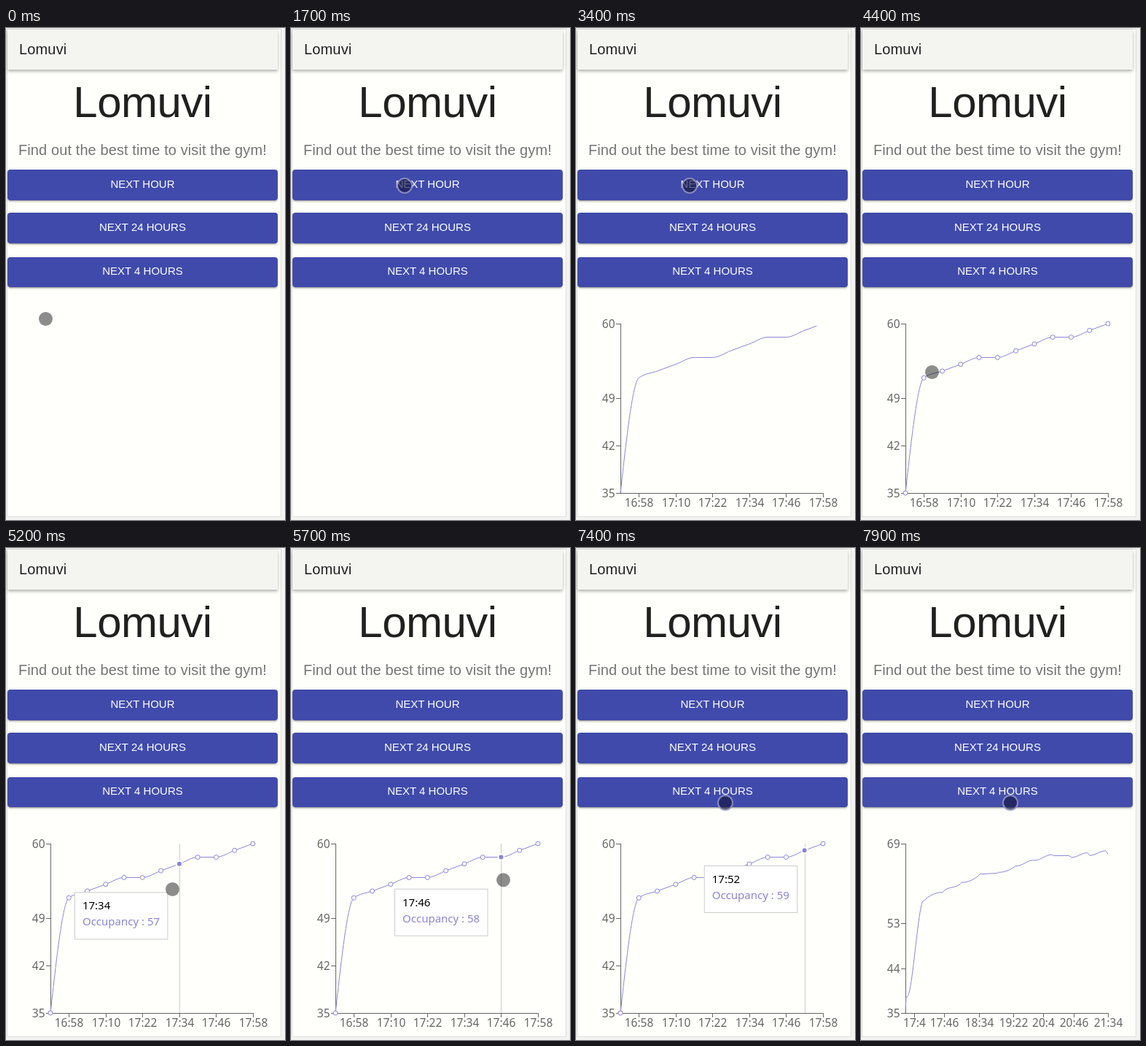
Animation, 383 px wide and 674 px high, one loop 8 s. Source, as an HTML page with a canvas:

```html
<!DOCTYPE html>
<html lang="en">
<head>
<meta charset="utf-8">
<title>Lomuvi</title>
<style>
  html, body { margin: 0; width: 100%; height: 100%; overflow: hidden; background: #f3f3f2; }
  body { font-family: "Liberation Sans", Arial, sans-serif; }
  #stage { position: absolute; left: 0; top: 0; width: 383px; height: 674px; overflow: hidden; }
  #stage > * { position: absolute; box-sizing: border-box; white-space: nowrap; }
  .page { left: 1px; top: 1px; width: 377px; height: 669px; background: #fffffb; border: 1px solid #dededc; }
  .bar { left: 2px; top: 2px; width: 371px; height: 55px; background: #f4f4f1; color: #212121;
    font-size: 20px; line-height: 55px; padding-left: 16px; letter-spacing: .15px;
    box-shadow: 0 2px 4px -1px rgba(0,0,0,.2), 0 3px 4px rgba(0,0,0,.12), 0 1px 8px rgba(0,0,0,.1); }
  .title { left: 2px; top: 67px; width: 371px; text-align: center; color: #20211f;
    font-size: 60px; line-height: 70px; letter-spacing: -.5px; }
  .sub { left: 17px; top: 155px; color: #757575; font-size: 20px; line-height: 24px; letter-spacing: .1px; }
  .btn { left: 2px; width: 371px; height: 42px; line-height: 39px; border-radius: 4px; background: #3f4aab;
    color: #fff; font-size: 15px; text-align: center;
    box-shadow: 0 3px 1px -2px rgba(0,0,0,.2), 0 2px 2px rgba(0,0,0,.14), 0 1px 5px rgba(0,0,0,.12); }
  .hour { top: 194px; }
  .day { top: 253px; }
  .four { top: 314px; height: 41px; line-height: 37px; }
  canvas { left: 0; top: 0; width: 383px; height: 674px; }
</style>
</head>
<body>
<div id="stage">
  <div class="page"></div>
  <div class="bar">Lomuvi</div>
  <div class="title">Lomuvi</div>
  <div class="sub">Find out the best time to visit the gym!</div>
  <div class="btn hour">NEXT HOUR</div>
  <div class="btn day">NEXT 24 HOURS</div>
  <div class="btn four">NEXT 4 HOURS</div>
  <canvas id="view"></canvas>
</div>
<script>
const LOOP = 8000, STEP = 100;
const LEFT = 61, RIGHT = 339, TOP = 405, BOTTOM = 637;
const PURPLE = '#8884d8', GREY = '#666';
const SANS = '"Noto Sans", "Open Sans", sans-serif';

// Event times
const PRESS_A = 1700, CHART_A = 2100, DRAW = 2200, RELEASE = 3500, DOTS = 3800;
const HOVER = 4500, LAST_HOVER = 6200, PRESS_B = 7400, CHART_B = 7800;

const canvas = document.getElementById('view');
const ctx = canvas.getContext('2d');
const ratio = window.devicePixelRatio || 1;
canvas.width = 383 * ratio;
canvas.height = 674 * ratio;

const clamp = (v, lo, hi) => Math.max(lo, Math.min(hi, v));
const mix = (a, b, f) => a + (b - a) * f;

function easeInOut(f) {
  f = clamp(f, 0, 1);
  return f * f * f * (10 - 15 * f + 6 * f * f);
}

// Pointer moves: start, end, destination, upward bulge of the path
const moves = [
  [600, 800, 94, 353], [900, 1400, 156, 216], [3400, 3900, 98, 437], [4000, 4400, 97.5, 471.5],
  [4400, 5200, 228.5, 467.5, 17], [5200, 6200, 312.5, 450.5], [6200, 6500, 237, 397],
  [6600, 7000, 205, 349]
];

function pointerAt(t) {
  let x = 54.5, y = 398.5;
  for (const [start, end, tx, ty, bulge = 0] of moves) {
    if (t <= start) break;
    const f = Math.min(1, (t - start) / (end - start));
    const e = 1 - (1 - f) ** 2;
    x = mix(x, tx, e);
    y = mix(y, ty, e) - bulge * Math.sin(Math.PI * f);
  }
  return [x, y];
}

// Occupancy every six minutes from 16:52
const hourValue = i => i ? Math.round(52.3 + .75 * (i - 1)) : 35;
const longValue = i => i < 12 ? hourValue(i)
  : Math.min(69, Math.round(69.3 - (i < 30 ? .026 : .041) * (i - 30) ** 2));

function clock(i) {
  const m = 16 * 60 + 52 + 6 * i;
  return Math.floor(m / 60) + ':' + m % 60;
}

const yOf = (v, max) => mix(BOTTOM, TOP, (v - 35) / (max - 35));
const xOf = (i, last) => mix(LEFT, RIGHT, i / last);
const plot = (count, value, max) =>
  Array.from({ length: count }, (_, i) => [xOf(i, count - 1), yOf(value(i), max)]);

const hourPoints = plot(12, hourValue, 60);
const longPoints = plot(48, longValue, 69);

// Monotone cubic through the points, as path data
function monotone(p) {
  const n = p.length, slope = [], tan = [];
  for (let i = 0; i < n - 1; i++) slope[i] = (p[i + 1][1] - p[i][1]) / (p[i + 1][0] - p[i][0]);
  for (let i = 1; i < n - 1; i++) {
    const a = slope[i - 1], b = slope[i];
    const ha = p[i][0] - p[i - 1][0], hb = p[i + 1][0] - p[i][0];
    const mean = (a * hb + b * ha) / (ha + hb);
    tan[i] = (Math.sign(a) + Math.sign(b)) * Math.min(Math.abs(a), Math.abs(b), Math.abs(mean) / 2) || 0;
  }
  tan[0] = (3 * slope[0] - tan[1]) / 2;
  tan[n - 1] = (3 * slope[n - 2] - tan[n - 2]) / 2;
  let d = 'M' + p[0];
  for (let i = 0; i < n - 1; i++) {
    const [x0, y0] = p[i], [x1, y1] = p[i + 1], h = (x1 - x0) / 3;
    d += `C${x0 + h},${y0 + h * tan[i]},${x1 - h},${y1 - h * tan[i + 1]},${x1},${y1}`;
  }
  return d;
}

const hourCurve = monotone(hourPoints);
const ruler = document.createElementNS('http://www.w3.org/2000/svg', 'path');
ruler.setAttribute('d', hourCurve);
const hourLength = ruler.getTotalLength();

function line(x0, y0, x1, y1, color) {
  ctx.strokeStyle = color;
  ctx.lineWidth = 1;
  ctx.beginPath();
  ctx.moveTo(x0, y0);
  ctx.lineTo(x1, y1);
  ctx.stroke();
}

function disc(x, y, r, fill, stroke, width) {
  ctx.beginPath();
  ctx.arc(x, y, r, 0, Math.PI * 2);
  ctx.fillStyle = fill;
  ctx.fill();
  if (!stroke) return;
  ctx.strokeStyle = stroke;
  ctx.lineWidth = width;
  ctx.stroke();
}

function text(s, x, y, size, color, align) {
  ctx.font = size + 'px ' + SANS;
  ctx.fillStyle = color;
  ctx.textAlign = align;
  ctx.fillText(s, x, y);
}

function axes(max, yTicks, xTicks, last) {
  line(LEFT + .5, TOP, LEFT + .5, BOTTOM, GREY);
  line(LEFT, BOTTOM + .5, RIGHT + .5, BOTTOM + .5, GREY);
  for (const v of yTicks) {
    const y = Math.round(yOf(v, max));
    line(LEFT - 6, y + .5, LEFT, y + .5, GREY);
    text(v, 53.5, y + 5.5, 15.5, GREY, 'right');
  }
  for (const i of xTicks) {
    const x = Math.round(xOf(i, last)) + .5;
    line(x, BOTTOM, x, BOTTOM + 6, GREY);
    text(clock(i), x, 656, 15.5, GREY, 'center');
  }
}

function curve(d, dash = []) {
  ctx.strokeStyle = PURPLE;
  ctx.lineWidth = 1;
  ctx.setLineDash(dash);
  ctx.stroke(new Path2D(d));
  ctx.setLineDash([]);
}

function activeIndex(t) {
  const x = pointerAt(Math.min(t, LAST_HOVER))[0];
  return clamp(Math.round((x - LEFT) / (RIGHT - LEFT) * 11), 0, 11);
}

function tipGoal(t) {
  const x = hourPoints[activeIndex(t)][0];
  const y = Math.max(pointerAt(t)[1], TOP + 20) + 10;
  return [x < 120 ? x + 10 : Math.max(82, x - 138), y];
}

// The box trails its goal: mean of the last three steps
function tipAt(t) {
  const goals = [0, 1, 2].map(n => tipGoal(Math.max(HOVER, t - n * STEP)));
  return [0, 1].map(k => goals.reduce((sum, g) => sum + g[k], 0) / 3);
}

function tooltip(t) {
  const i = activeIndex(t);
  const [x, y] = tipAt(t);
  disc(...hourPoints[i], 4, PURPLE, '#fff', 2);
  ctx.fillStyle = '#fff';
  ctx.fillRect(x, y, 128, 64);
  ctx.strokeStyle = '#ccc';
  ctx.lineWidth = 1;
  ctx.strokeRect(x + .5, y + .5, 127.5, 64);
  text(clock(i), x + 11, y + 24, 15, '#000', 'left');
  text('Occupancy : ' + hourValue(i), x + 11, y + 46, 15, PURPLE, 'left');
}

function hourChart(t) {
  axes(60, [35, 42, 49, 60], [1, 3, 5, 7, 9, 11], 11);
  if (t >= HOVER) {
    const x = Math.round(hourPoints[activeIndex(t)][0]) + .5;
    line(x, TOP, x, BOTTOM, '#ccc');
  }
  const shown = mix(.05, 1, easeInOut((t - DRAW) / 1400));
  curve(hourCurve, shown < 1 ? [shown * hourLength, hourLength * 2] : []);
  if (t >= DOTS) for (const [x, y] of hourPoints) disc(x, y, 3, '#fff', PURPLE, 1);
  if (t >= HOVER) tooltip(t);
}

// Each old point splits into four that glide to their new places
function longChart(t) {
  axes(69, [35, 44, 53, 69], [2, 9, 17, 25, 32, 39, 47], 47);
  const f = easeInOut((t - PRESS_B) / 1600);
  curve(monotone(longPoints.map(([x, y], i) => {
    const [ox, oy] = hourPoints[i >> 2];
    return [mix(ox, x, f), mix(oy, y, f)];
  })));
}

function ripple(t, start, top) {
  const f = (t - start) / 800;
  if (f <= 0 || f >= 1) return;
  ctx.save();
  ctx.beginPath();
  ctx.roundRect(2, top, 371, 41.5, 4);
  ctx.clip();
  disc(...pointerAt(start), 20 + 600 * f, `rgba(255,255,255,${.06 * (1 - f)})`);
  ctx.restore();
}

function pointer(t) {
  const [x, y] = pointerAt(t);
  const pressed = (t >= PRESS_A && t < RELEASE) || t >= PRESS_B;
  if (pressed) disc(x, y, 10, 'rgba(20,22,62,.65)', 'rgba(150,150,200,.85)', 2);
  else disc(x, y, 9.5, 'rgba(0,0,0,.45)');
}

function render(t) {
  ctx.setTransform(ratio, 0, 0, ratio, 0, 0);
  ctx.clearRect(0, 0, 383, 674);
  ripple(t, PRESS_A, 194);
  ripple(t, PRESS_B, 314);
  if (t >= CHART_B) longChart(t);
  else if (t >= CHART_A) hourChart(t);
  pointer(t);
}

const begin = performance.now();
function tick() {
  const t = (performance.now() - begin) % LOOP;
  render(Math.floor(t / STEP) * STEP);
  requestAnimationFrame(tick);
}
tick();
</script>
</body>
</html>
```
